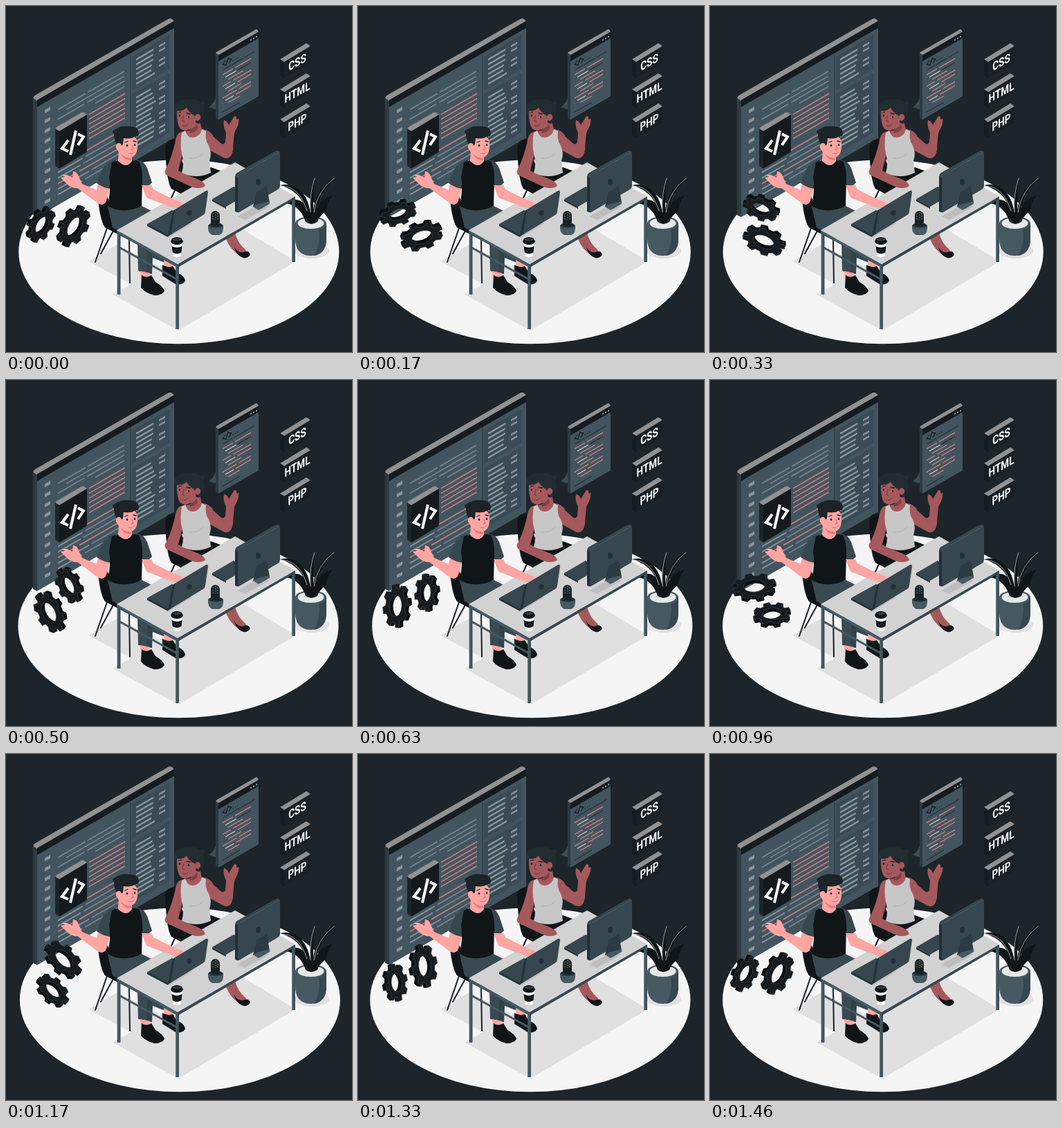
Animation of 500 by 500 pixels, one loop 1500 ms. Source, as an HTML page:

```html
<!DOCTYPE html>
<html lang="en">
<head>
<meta charset="utf-8">
<title>Developers at work</title>
<style>
html, body { margin: 0; width: 100%; height: 100%; overflow: hidden; background: #1d252a; }
svg { display: block; width: 100vw; height: 100vh; }
text { font-family: Roboto, "Liberation Sans", sans-serif; font-weight: 700; }
.k { fill: #101518; } .d { fill: #232f36; } .m { fill: #37474f; } .s { fill: #455a64; }
.g { fill: #919191; } .pink { fill: #ffa5a2; } .brown { fill: #a4595c; } .grey { fill: #c7c7c7; }
.ln { fill: none; stroke-linecap: round; stroke-linejoin: round; }
</style>
</head>
<body>
<svg viewBox="0 0 500 500">
  <rect width="500" height="500" fill="#1d252a"/>
  <ellipse id="floor" cx="249.8" cy="355.3" rx="231.5" ry="133" fill="#f5f5f5"/>

  <!-- floor shadows -->
  <path fill="#e0e0e0" d="M119 369L160 345L270 400L226 426ZM154 417L331 316L419 369L249 469Z"/>
  <ellipse cx="442" cy="354" rx="25" ry="11" fill="#e0e0e0"/>

  <!-- wall screen -->
  <path class="g" d="M39 134Q39 131 42 129L234 19Q237 17 240 19L243 22L45 137Z"/>
  <path fill="#2d3a42" d="M39 133L45 137V305L39 302Z"/>
  <g id="screen" transform="matrix(1 -.577 0 1 45 136)">
    <rect width="198" height="169" fill="#42555f"/>
    <rect width="198" height="10" fill="#151b1f"/>
    <rect x="137" y="16" width="55" height="49" fill="#3a4b55"/>
    <rect x="137" y="71" width="55" height="86" fill="#3a4b55"/>
    <path fill="#36464f" d="M134 10h2v159h-2z"/>
  </g>
  <!-- code tile -->
  <path class="g" d="M71 178Q71 176 73 175L109 154Q111 153 113 154L117 157L77 181Z"/>
  <path fill="#1d252a" d="M71 177L77 181V235L71 231Z"/>
  <path fill="#141a1e" d="M77 181L117 157V209Q117 211 115 212L77 235Z"/>
  <path class="ln" stroke="#fff" stroke-width="4" style="stroke-linecap:butt;stroke-linejoin:miter" d="M90 194L81 206L90 210M101 180L93 215M104 185L112 189L104 201"/>

  <!-- small window -->
  <path fill="#3b4c56" d="M304 128Q302 140 293 146L304 150Z"/>
  <path class="g" d="M303 69Q303 67 305 66L359 35Q361 33 363 34L365 37.500L307 71Z"/>
  <path fill="#2d3a42" d="M303 68L307 71V164L303 162Z"/>
  <g id="win" transform="matrix(1 -.577 0 1 307 71)">
    <rect width="58" height="93" fill="#42555f"/>
    <rect width="58" height="9" fill="#151b1f"/>
    <path stroke="#98a2a7" stroke-width="2" d="M46 5h2m2 0h2m2 0h2"/>
    <path class="ln" stroke="#141a1e" stroke-width="1.300" d="M10 14l-4 3l4 3M14 12l-3 9M15 14l4 3l-4 3M21 20h.2m3 0h.2m3 0h.2"/>
  </g>

  <g id="tags"></g>

  <!-- plant -->
  <path fill="#465963" d="M418 313V336Q418 360 440 361Q463 360 463 336V313Z"/>
  <path fill="#37474f" d="M452 320L463 315V336Q463 358 445 361Q455 346 452 320Z"/>
  <ellipse cx="440.500" cy="314" rx="22.500" ry="10" fill="#455a64"/>
  <ellipse cx="440.500" cy="314" rx="19" ry="8" fill="#e8e8e8"/>
  <path class="k" d="M396 259Q423 253 436 283L440 297Q437 270 446 248Q444 276 444 295Q448 264 474 249Q454 270 449 292Q455 278 472 274Q463 286 463 296Q452 304 450 312Q441 318 433 312Q425 288 404 285Q417 275 429 284Q420 266 396 259Z"/>
  <path class="ln" stroke="#dce0e2" stroke-width=".7" d="M397 260Q424 260 435 296M446 249Q438 272 440 298M474 249Q449 268 445 298"/>

  <!-- woman -->
  <path class="k" d="M230 206Q231 192 243 193L263 247L310 240L306 258L262 276L239 264Q232 254 230 206Z"/>
  <path class="ln" stroke="#101518" stroke-width="2" d="M246 262L239 277M255 264L262 288"/>
  <path class="brown" d="M316 330L331 328Q335 343 346 352L349 359L338 361Q321 350 316 330Z"/>
  <path class="k" d="M329 347Q334 357 343 356Q350 352 353 359Q350 365 343 364Q333 361 329 347Z"/>
  <path class="k" d="M252 240Q275 250 296 233L318 241L300 270L262 275Z"/>
  <path class="brown" d="M284 178Q295 179 300 189L310 198Q315 202 317 196L318 183Q313 173 315 165Q320 166 322 172L330 159Q334 159 333 164L336 163Q338 169 331 181Q329 186 328 208Q325 224 314 219L290 206Z"/>
  <path class="brown" d="M268 172L280 166L283 178L289 183L284 196L258 202L249 238L278 251Q290 257 287 261Q278 266 266 260L235 246Q227 243 231 235Q240 219 246 190Q248 182 257 181L267 180Z"/>
  <path class="grey" d="M254 183L259 180Q262 191 271 190Q281 188 283 178L289 181Q287 193 293 202Q298 212 294 224L296 241Q275 251 254 241Q258 228 254 213Q251 199 254 183Z"/>
  <path class="ln" stroke="#aaa" stroke-width=".8" d="M265 220Q277 221 285 213"/>
  <path class="brown" d="M248 146Q246 158 248 168Q250 180 259 180Q271 178 276 168L280 148L262 141Z"/>
  <path fill="#7f4045" d="M265 179Q272 177 276 171L277 177Q271 184 266 183Z"/>
  <path fill="#222c31" d="M243 150Q242 138 255 136Q273 132 281 139Q288 135 287 143L285 144Q289 156 283 166Q279 173 274 168Q275 163 272 158Q264 154 261 147Q255 153 247 151L247 158Q243 155 243 150Z"/>
  <ellipse cx="277" cy="161" rx="4" ry="5" class="brown"/>
  <path class="ln" stroke="#20171a" stroke-width="1.300" d="M250 154l3-1M261 155l5 1"/>
  <path class="k" d="M251 157a1.200 1.600 0 1 0 .1 0M264 159a1.200 1.600 0 1 0 .1 0"/>
  <path class="ln" stroke="#69343a" d="M257 158L255 166L258 167M255 173Q260 175 263 171"/>

  <!-- man -->
  <path class="ln" stroke="#182024" stroke-width="2" d="M146 321L129 370M155 325L137 358M178 339L179 400"/>
  <path class="k" d="M132 268Q131 259 140 261L165 318L190 326Q187 336 177 338L143 320Q135 309 132 268Z"/>
  <path fill="#3a4a53" d="M146 286Q168 298 196 289L232 307L232 372L212 364L211 387L191 383L190 340L154 320Z"/>
  <path fill="#334149" d="M205 340L211 345L211 387L203 386Z"/>
  <path class="pink" d="M194 383L208 386L207 398L195 396ZM228 367L242 372L241 383L229 380Z"/>
  <path class="k" d="M196 389Q203 394 210 389L216 399Q227 405 229 412Q224 419 214 418Q202 415 195 407ZM226 374Q234 379 241 376L247 385Q258 390 259 397Q256 404 245 402L226 390Z"/>
  <path class="pink" d="M134 253L151 253Q149 272 144 284Q139 290 131 284L103 263Q97 264 90 259L79 248L85 247L80 244L88 244L96 248L97 239Q102 239 105 246L110 257L131 266Z"/>
  <path fill="#37474f" d="M157 222Q145 226 138 238L131 256Q140 263 152 264L165 235ZM188 222Q199 223 204 234L211 255Q205 263 195 262L184 235Z"/>
  <path class="k" d="M153 226Q168 219 192 224Q198 236 197 252L196 289Q169 302 147 289Q152 265 149 247Z"/>
  <path class="pink" d="M163 208L182 211L182 224Q174 236 162 224Z"/>
  <path class="pink" d="M163 193Q168 184 184 188Q191 191 190 204Q189 218 179 219Q166 218 161 208Z"/>
  <path fill="#e67c7d" d="M165 213Q172 220 181 219L181 223Q171 224 165 213Z"/>
  <path fill="#1c2428" d="M156 185Q151 181 157 179Q167 172 180 174Q192 175 192 184Q192 189 188 188Q180 193 170 191L169 200L164 204Q156 199 156 185Z"/>
  <ellipse cx="163" cy="203" rx="4.200" ry="5" class="pink"/>
  <path class="k" d="M175 200a1.200 1.600 0 1 0 .1 0M186 199a1.200 1.600 0 1 0 .1 0"/>
  <path class="ln" stroke="#1c2428" stroke-width="1.300" d="M172 197l4-1.500M184 195l4 1"/>
  <path class="ln" stroke="#d76468" d="M182 201L184 207L181 208M177 213Q182 215 185 211"/>

  <!-- desk -->
  <path class="ln" stroke="#455a64" stroke-width="3" d="M164 349L247 395"/>
  <path class="ln" stroke="#455a64" stroke-width="4.600" style="stroke-linecap:butt" d="M163 325V417M247.500 374V467M415.500 276V370"/>
  <path class="ln" stroke="#37474f" stroke-width="1.300" d="M164.600 328V416M249 377V465M417 280V369"/>
  <path class="m" d="M160 324L248 373L418 275V279L248 378L160 328Z"/>
  <path class="s" d="M160 324L248 373V378L160 328Z"/>
  <path fill="#d2d2d2" d="M160 324L331 226L418 275L248 373Z"/>
  <path fill="#bdbdbd" d="M334 304L371 284L380 290L345 309ZM205 318L240 298L269 314L235 335Z"/>

  <!-- arms resting on the desk -->
  <path class="pink" d="M196 259L210 259L213 265L241 279Q255 283 259 289Q252 295 240 291L203 277Z"/>
  <path class="brown" d="M245 238L278 251Q290 257 287 261Q278 266 265 260L245 250Z"/>

  <!-- laptop -->
  <path class="m" d="M204 315L240 295L268 310L234 333Z"/>
  <path class="d" d="M204 315L234 331V334L204 318Z"/>
  <path class="m" d="M241 297Q242 295 244 294L289 267Q292 266 292 269L288 297Q288 300 285 302L234 333Z"/>
  <path class="d" d="M241 297L244 294L238 330L234 333Z"/>
  <ellipse cx="265" cy="299" rx="3.300" ry="4.200" class="d" transform="rotate(25 265 299)"/>

  <!-- keyboard and monitor -->
  <path class="m" d="M298 279L329 261L349 272L318 290Z"/>
  <path class="d" d="M298 279L318 290V293L298 282Z"/>
  <path class="m" d="M331 246Q331 243 334 241L389 210Q392 208 395 210L396 213V260Q396 263 393 265L337 298Q334 299 331 297Z"/>
  <path class="d" d="M331 246L335 248V298L331 296Z"/>
  <path class="ln" stroke="#51646e" stroke-width=".8" d="M335 248Q335 246 338 244L395 211"/>
  <ellipse cx="364.500" cy="254" rx="3.400" ry="4.500" class="d"/>
  <path fill="#2c3a42" d="M362 269L377 260L381 285L365 294L357 290Z"/>
  <path class="s" d="M357 290L365 286L381 282V286L365 295Z"/>

  <!-- cactus -->
  <path fill="#1a2226" d="M296 320V302Q297 296 303 296Q309 297 309 304V320Z"/>
  <path class="ln" stroke="#82918f" stroke-width="1" stroke-dasharray="1 2.500" d="M299 300V317M303 298V318M306 300V317"/>
  <path class="s" d="M292 317Q303 311 314 317Q315 329 308 331H298Q291 328 292 317Z"/>
  <ellipse cx="303" cy="317" rx="10.500" ry="3.700" class="d"/>
  <path fill="#1a2226" d="M297 318V309H309V318Z"/>

  <!-- cup -->
  <path fill="#fff" d="M239 341H255L252.500 361Q247 365 241.500 361Z"/>
  <path class="k" d="M239.500 347Q247 351 254.500 347L253.500 356Q247 360 240.700 356Z"/>
  <path class="k" d="M238 340L240 336Q247 332 254 336L256 340Q255 345 247 345Q239 345 238 340Z"/>
  <ellipse cx="247" cy="337.500" rx="6" ry="2" fill="#303a40"/>

  <g id="gears"></g>
</svg>
<script>
const NS = 'http://www.w3.org/2000/svg';
const $ = id => document.getElementById(id);
const add = (parent, tag, attrs) => {
  const el = document.createElementNS(NS, tag);
  for (const key in attrs) el.setAttribute(key, attrs[key]);
  return parent.appendChild(el);
};
const GREY = '#87949b', DIM = '#71818a', PINK = '#b97a7e', DARK = '#26323a';
const bar = (parent, x, y, w, stroke, h = 2.2) =>
  add(parent, 'path', { d: `M${x} ${y}h${w}`, stroke, 'stroke-width': h });

// Repeatable noise for line lengths
let seed = 11;
const rnd = () => (seed = seed * 16807 % 2147483647) / 2147483647;

const screen = $('screen');
for (let y = 23; y < 160; y += 14.6) bar(screen, 11, y, 8, GREY, 5);
[[30, 31, 40], [73, 31, 53], [42, 38, 84], [30, 45, 38], [72, 45, 54], [84, 53, 42]]
  .forEach(([x, y, w]) => bar(screen, x, y, w, DIM));
for (let i = 0; i < 6; i++) bar(screen, 75, 64 + i * 7, 52, PINK);
for (let i = 0; i < 6; i++) {
  const y = 114 + i * 8, w = 26 + rnd() * 22;
  bar(screen, 30, y, w, i == 3 ? PINK : GREY);
  bar(screen, 34 + w, y, 92 - w, i % 3 == 0 ? PINK : DIM);
}
const column = (top, rows) => {
  for (let i = 0; i < rows; i++) {
    const w = 20 + rnd() * 10, y = top + i * 7;
    bar(screen, 143, y, w, GREY, 2.8);
    if (i % 3 < 2) bar(screen, 176, y, 9, GREY, 2.8);
  }
};
column(24, 6);
column(79, 11);

const win = $('win');
bar(win, 6, 25, 46, DARK, 1.5);
for (let i = 0; i < 9; i++) {
  const y = 32 + i * 5.6, w = 12 + rnd() * 12, x = 6 + i % 3 * 4;
  bar(win, x, y, w, i % 3 == 1 ? '#c5cbce' : '#d08585', 1.5);
  if (i % 3 != 2) bar(win, x + w + 3, y, 38 - w - i % 3 * 4, i % 4 == 1 ? DARK : '#d08585', 1.5);
}
bar(win, 6, 86, 25, DARK, 1.5);

['CSS', 'HTML', 'PHP'].forEach((name, i) => {
  const tag = add($('tags'), 'g', { transform: `translate(0 ${i * 43.5})` });
  add(tag, 'path', { class: 'g', d: 'M396 77L432 55Q434 53 436 55L440 58L402 81Z' });
  add(tag, 'path', { fill: '#161c20', d: 'M396 77L402 81V104L396 100Z' });
  add(tag, 'path', { fill: '#1a2126', d: 'M402 81L440 58V81L402 104Z' });
  add(tag, 'text', {
    transform: 'matrix(.82 -.46 0 1.05 421 87)', 'text-anchor': 'middle', 'font-size': 16.5, fill: '#fff'
  }).textContent = name;
});

// Toothed ring, flat on the same plane as the wall screen
const gearPath = (r, teeth = 8) => {
  const pts = [];
  for (let i = 0; i < teeth; i++) {
    [[-.31, .78], [-.2, 1], [.2, 1], [.31, .78]].forEach(([off, k]) => {
      const a = (i + off) * 2 * Math.PI / teeth + .54;
      pts.push((r * k * Math.cos(a)).toFixed(2) + ' ' + (r * k * Math.sin(a)).toFixed(2));
    });
  }
  const h = r * .49;
  return `M${pts.join('L')}ZM${h} 0A${h} ${h} 0 1 0 ${-h} 0A${h} ${h} 0 1 0 ${h} 0Z`;
};
const gear = (x, y, r) => {
  const d = gearPath(r);
  for (let i = 8; i >= 0; i--) {
    add($('gears'), 'path', {
      d, 'fill-rule': 'evenodd',
      transform: `matrix(.866 -.5 0 1 ${x - i * .6} ${y - i * .35})`,
      fill: i ? '#0d1114' : '#161c20',
      stroke: i ? 'none' : '#4a565d', 'stroke-width': .5
    });
  }
};
gear(52.3, 317, 22.5);
gear(99.5, 319.5, 26);

const LOOP = 1500, FRAMES = 36, SPAN = 35.3;
const SHAKE = [0, -1, 2, -4, 4, -4, 4, -4, 2, -1, 0];
const shake = p => {
  const s = p * 10, i = Math.floor(s);
  return SHAKE[i] + (SHAKE[i + 1] - SHAKE[i]) * (s - i);
};

function draw(now) {
  const step = Math.min(FRAMES - 1, Math.floor((now % LOOP + 5) * FRAMES / LOOP));
  const p = step / SPAN;
  $('gears').setAttribute('transform', `rotate(${p * 360} 76 317.5)`);
  $('floor').setAttribute('transform', `translate(${shake(p)})`);
}
let start;
function tick(now) {
  start ??= now;
  draw(now - start);
  requestAnimationFrame(tick);
}
draw(0);
requestAnimationFrame(tick);
</script>
</body>
</html>
```
